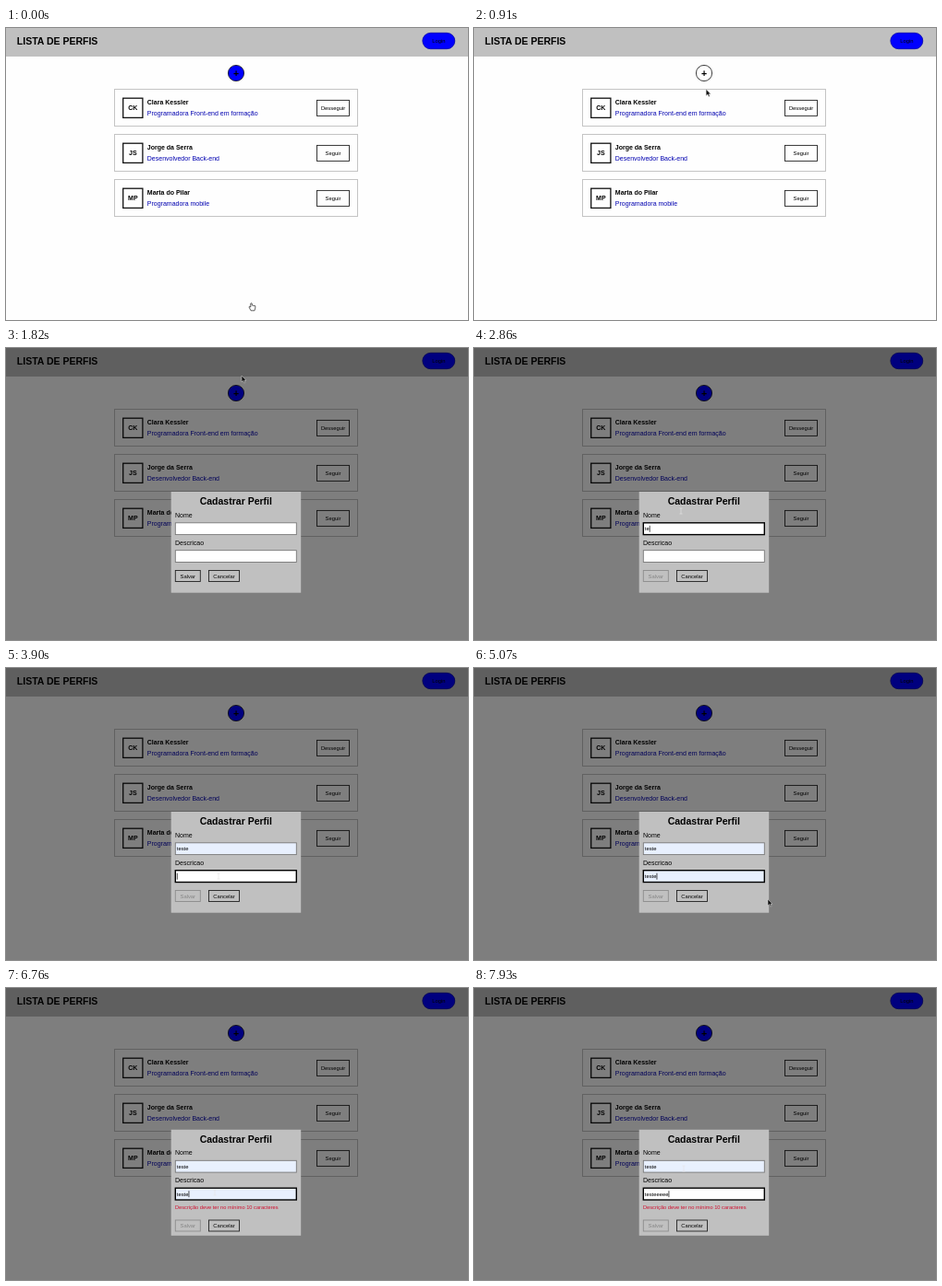
An HTML page that plays this animation: 500x317 px, repeating every 8 s.

```html
<!DOCTYPE html>
<html lang="pt-BR">
<head>
<meta charset="utf-8">
<title>Lista de perfis</title>
<style>
  html, body { margin: 0; width: 100%; height: 100%; overflow: hidden; background: #fefefe; }
  svg { display: block; width: 100%; height: 100%; font: 7px "Liberation Sans", Arial, sans-serif; }
  .title { font-size: 10.5px; font-weight: bold; }
  .bold { font-weight: bold; }
  .small { font-size: 5.83px; }
  .mid { text-anchor: middle; }
  .role { fill: #0000b0; }
  .box { fill: none; stroke: #222; stroke-width: .9; }
  .card { fill: none; stroke: #c4c4c4; }
  .field { fill: #fff; stroke: #777; stroke-width: .9; }
  .field.auto { fill: #e8f0fe; }
  .field.focus { stroke: #000; stroke-width: 1.4; }
  .off .box { stroke: #8c8c8c; }
  .off text { fill: #858585; }
  .error { fill: #d01030; font-size: 5.7px; }
</style>
</head>
<body>
<svg id="stage" viewBox="0 0 500 317"></svg>
<script>
const LOOP = 8000, STEP = 130;
const OPEN = 1820, ERROR = 5330;

const profiles = [
  ["CK", "Clara Kessler", "Programadora Front-end em formação", "Desseguir"],
  ["JS", "Jorge da Serra", "Desenvolvedor Back-end", "Seguir"],
  ["MP", "Marta do Pilar", "Programadora mobile", "Seguir"]
];

const text = (x, y, s, cls = "") => `<text x="${x}" y="${y}" class="${cls}">${s}</text>`;
const rect = (x, y, w, h, cls) => `<rect x="${x}" y="${y}" width="${w}" height="${h}" class="${cls}"/>`;
const button = (x, y, w, h, s) =>
  rect(x, y, w, h, "box") + text(x + w / 2, y + h / 2 + 2.1, s, "small mid");

const card = ([initials, name, role, action], i) => `<g transform="translate(0 ${i * 49})">
  ${rect(117.5, 66.5, 263, 40, "card")}
  <rect x="126.7" y="76.2" width="21.2" height="21.2" fill="none" stroke="#111" stroke-width="1.3"/>
  ${text(137.3, 89.3, initials, "bold mid")}
  ${text(152.8, 82.8, name, "bold")}${text(152.8, 95, role, "role")}
  ${button(336.5, 78.4, 35, 17, action)}</g>`;

const field = (id, label, y) => text(183, y - 6, label) +
  `<g id="${id}">${rect(183.3, y, 131, 12.8, "field")}${text(184.8, y + 8.4, "", "small")}
  <path stroke="#000" stroke-width=".7"/></g>`;

const $ = id => document.getElementById(id);
const show = (id, on) => $(id).setAttribute("display", on ? "inline" : "none");

$("stage").innerHTML = `
  <rect width="500" height="317" fill="#fefefe"/>
  <rect width="500" height="31" fill="#c0c0c0"/>
  ${text(11.8, 17.6, "LISTA DE PERFIS", "title")}
  <rect x="450.8" y="5.3" width="35" height="17.4" rx="8.7" fill="#00f" stroke="#0000a0" stroke-width=".7"/>
  ${text(468.3, 16.3, "Login", "small mid")}
  <circle id="add" cx="249" cy="49" r="8.6" stroke="#111" stroke-width=".8"/>
  ${text(249, 52.5, "+", "title mid")}
  ${profiles.map(card).join("")}
  <g id="modal">
    <rect width="500" height="317" fill="#000" fill-opacity=".5"/>
    <rect id="panel" x="178.7" width="140.5" fill="#c0c0c0"/>
    <g id="form">
      ${text(248.8, 170.2, "Cadastrar Perfil", "title mid")}
      ${field("name", "Nome", 189.8)}${field("about", "Descricao", 219.7)}
      <g id="error">${text(183, 242, "Descrição deve ter no mínimo 10 caracteres", "error")}</g>
    </g>
    <g id="actions">
      <g id="save">${button(183.3, 241.5, 27, 12, "Salvar")}</g>
      ${button(219.5, 241.5, 33, 12, "Cancelar")}
    </g>
  </g>
  <g id="cursor">
    <path id="arrow" d="M0 0V7L1.7 5.5 2.8 8 4 7.5 2.9 5.1H5Z" fill="#111" stroke="#ddd" stroke-width=".5"/>
    <path id="hand" d="M-1.2 0V4L-2.5 3.2-3 4-1 7.8H3L3.8 5V2.7L.2 2V0Q-.5-.8-1.2 0Z" fill="#fff" stroke="#222" stroke-width=".7"/>
    <path id="beam" d="M-1.5-3H1.5M0-3V3M-1.5 3H1.5" fill="none" stroke="#e4e4e4" stroke-width=".6"/>
  </g>`;

// Pointer stops: time, x, y
const route = [
  [0, 266, 299], [260, 266, 299], [1040, 250, 48], [1430, 250, 48], [1690, 255, 30],
  [1950, 255, 30], [2470, 228, 194], [2860, 224, 177], [3250, 222, 185], [3510, 212, 208],
  [3900, 230, 226], [4290, 230, 226], [4680, 215, 238], [5070, 318, 251], [5330, 326, 250],
  [5590, 320, 246], [5980, 219, 198], [6240, 226, 222], [6760, 226, 222], [7150, 227, 196]
];

// Field contents: time, text, autofilled
const typedName = [[0, ""], [2730, "t"], [2860, "te"], [3120, "tes"], [3510, "teste", true]];
const typedAbout = [[0, ""], [4290, "t"], [4420, "te"], [4680, "teste", true],
  [7150, "testee"], [7410, "testeee"], [7540, "testeeee"], [7670, "testeeeee"]];

const latest = (list, t) => list.findLast(k => k[0] <= t);

function pointer(t) {
  const i = route.findIndex(k => k[0] > t);
  if (i < 0) return route.at(-1).slice(1);
  const [t0, x0, y0] = route[i - 1], [t1, x1, y1] = route[i];
  const p = (t - t0) / (t1 - t0), e = p * p * (3 - 2 * p);
  return [x0 + (x1 - x0) * e, y0 + (y1 - y0) * e];
}

function fill(id, [, value, auto], focus) {
  const [box, label, caret] = $(id).children;
  box.setAttribute("class", "field" + (auto ? " auto" : "") + (focus ? " focus" : ""));
  label.textContent = value;
  const x = 185.3 + (value ? label.getComputedTextLength() : 0);
  caret.setAttribute("d", focus ? `M${x} ${+box.getAttribute("y") + 3}v7` : "");
}

function draw(t) {
  const open = t >= OPEN, error = t >= ERROR;
  const hover = t >= 910 && !open;
  $("add").setAttribute("fill", hover ? "#fefefe" : "#00f");
  show("modal", open);
  show("error", error);
  $("panel").setAttribute("y", error ? 153.8 : 156);
  $("panel").setAttribute("height", error ? 115 : 109.7);
  $("form").setAttribute("transform", `translate(0 ${error ? -2.5 : 0})`);
  $("actions").setAttribute("transform", `translate(0 ${error ? 10.5 : 0})`);
  $("save").setAttribute("class", t >= 2730 ? "off" : "");
  fill("name", latest(typedName, t), t >= 2470 && t < 3900);
  fill("about", latest(typedAbout, t), t >= 3900 && !error || t >= 6500);

  const [x, y] = pointer(t);
  const hand = t < 260 || t >= 1040 && t < 1560;
  const beam = t >= 2340 && t < 3510 || t >= 3770 && t < 4550 || t >= 5850;
  $("cursor").setAttribute("transform", `translate(${x} ${y})`);
  show("hand", hand);
  show("beam", beam);
  show("arrow", !hand && !beam);
}

function frame() {
  const t = performance.now() % LOOP;
  draw(Math.floor(t / STEP) * STEP);
  requestAnimationFrame(frame);
}
frame();
</script>
</body>
</html>
```
